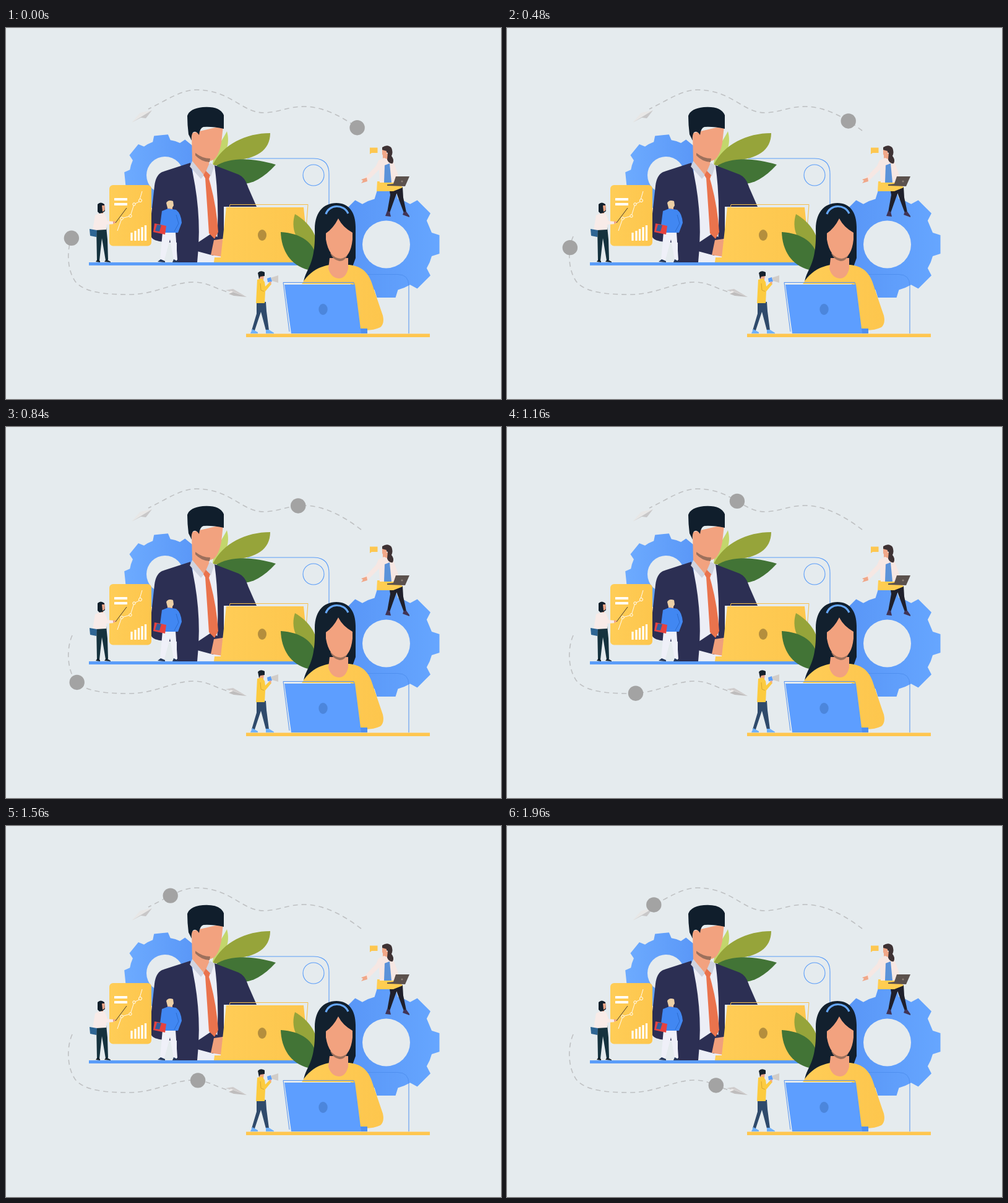
Write an HTML page that moves like this. It is 800 px wide and 600 px high and loops after 2 s.

```html
<!DOCTYPE html>
<html lang="en">
<head>
<meta charset="utf-8">
<title>Teamwork</title>
<style>
html, body { margin: 0; width: 100%; height: 100%; overflow: hidden; background: #e5ebee; }
svg { display: block; width: 800px; height: 600px; }
</style>
</head>
<body>
<svg viewBox="0 0 800 600">
<defs>
  <linearGradient id="blueL"><stop stop-color="#6dabff"/><stop offset="1" stop-color="#5794f6"/></linearGradient>
  <linearGradient id="blueR"><stop stop-color="#5794f6"/><stop offset="1" stop-color="#66a6ff"/></linearGradient>
  <linearGradient id="gold"><stop stop-color="#ffcd57"/><stop offset="1" stop-color="#fdc64d"/></linearGradient>
</defs>

<!-- gears and frames -->
<g id="gearL" fill="url(#blueL)"></g>
<circle cx="257" cy="238" r="30" fill="#e5ebee"/>
<g fill="none" stroke="#5b9df8" stroke-width="1.1">
  <path d="M390 211H497Q522 211 522 236V310"/><circle cx="497" cy="238" r="17"/>
</g>
<g id="gearR" fill="url(#blueR)"></g>
<circle cx="614.5" cy="350" r="38.5" fill="#e5ebee"/>
<path d="M575 398.500H633Q651 398.500 651 417V494" fill="none" stroke="#4f90f0"/>

<!-- leaves behind the man -->
<path d="M334 220C336 198 349 183 357 167C363 189 355 206 338 220Z" fill="#c3d66c"/>
<path d="M334 222C350 188 388 170 427 170C427 198 404 212 368 214L345 222Z" fill="#96a43a"/>
<path d="M338 224C364 207 402 211 436 221C414 245 394 255 372 252Z" fill="#427436"/>

<!-- man -->
<path d="M301 218L338 222L362 378H309L304 300Z" fill="#eceef6"/>
<path d="M301 217L252 233Q242 238 240 255L235 300V338Q238 347 276 347V379H309Q318 300 298 218Z" fill="#2c2f53"/>
<path d="M337 222L376 237Q387 242 391 257L405 289H352V340L341 348Q345 280 337 222Z" fill="#2c2f53"/>
<path d="M310 347L331 333L350 342L335 368L309 361Z" fill="#2c2f53"/>
<path d="M336 343L350 341V370L331 367Z" fill="#f0a07c"/>
<path d="M300 170L351 158L348 186Q342 216 328 215V235L320 239L301 219Z" fill="#f2a27f"/>
<path d="M306 202Q317 211 330 211L329 217Q315 216 306 206Z" fill="#9c705c"/>
<path d="M301 215L320 238L315 244L297 224ZM329 218L337 222L331 240L323 232Z" fill="#cfd3df"/>
<path d="M323 231L330 238L328 244Q340 285 343 330L337 341L328 332Q325 285 322 243L319 238Z" fill="#ea734d"/>
<path d="M293 142Q297 130 318 128Q346 126 352 141V163Q333 159 319 160Q313 162 312 173Q307 165 302 169Q299 173 300 182L295 172Q293 156 293 142Z" fill="#101e2c"/>

<!-- yellow laptop and ledge -->
<path d="M361 291L362 285.500H488L485 325" fill="none" stroke="#f4bd4a"/>
<path d="M356 290H481L490 379H336L337 371H347Z" fill="url(#gold)"/>
<ellipse cx="414" cy="335" rx="7" ry="9" fill="#b48e3d"/>
<path d="M134 379H490V384H134Z" fill="#5b9df9"/>

<!-- woman -->
<path d="M467 301C460 322 466 350 502 367C508 338 490 314 467 301Z" fill="#96a43a"/>
<path d="M444 330C476 332 500 346 503 378L488 391C460 384 445 360 444 330Z" fill="#427436"/>
<path d="M499 325C499 297 514 283 534 283C554 283 565 298 565 322V372L560 386L523 390L498 413H481C483 389 501 387 499 325Z" fill="#12202e"/>
<path d="M478 414C490 394 506 386 523 383H555C579 386 588 399 594 421L609 465Q612 478 605 484Q590 491 570 488L558 414Z" fill="url(#gold)"/>
<path d="M523 372H553V389Q549 405 538 405Q525 404 521 389Z" fill="#f2a27f"/>
<path d="M524 364H553Q549 377 539 377Q528 375 524 364Z" fill="#9c705c"/>
<path d="M537 308Q544 322 560 331V342Q557 371 541 373Q522 372 517 342V332Q529 324 537 308Z" fill="#f2a27f"/>
<path d="M517 301C522 285 546 284 553 300" fill="none" stroke="#66a8ff" stroke-width="3.2"/>

<!-- blue laptop and ledge -->
<path d="M458 491L448 411.500H562L563 416" fill="none" stroke="#5793ee"/>
<path d="M450 415H564L573 486H584V494H461Z" fill="#5d9eff"/>
<path d="M573 486H584V494H574Z" fill="#4f8ff0"/>
<ellipse cx="512.500" cy="455" rx="7.200" ry="9" fill="#4c86dc"/>
<path d="M388 494.500H685V500H388Z" fill="#ffc64f"/>

<!-- chart board -->
<rect x="167" y="254" width="68" height="98.500" rx="6" fill="url(#gold)"/>
<path d="M175 277H196M175 285H196" stroke="#fff" stroke-width="4"/>
<g fill="none" stroke="#fffaf0"><path d="M180 328L187 308L201 304L207 285L215 281L220 264"/></g>
<g fill="#ffca52" stroke="#fff"><circle cx="187" cy="308" r="2.200"/><circle cx="201" cy="304" r="2.200"/><circle cx="207" cy="285" r="2.200"/><circle cx="217" cy="279" r="2.500"/></g>
<path d="M203 344V331M209 344V328M214.500 344V325M220 344V322M225.500 344V319" stroke="#fff" stroke-width="3.200"/>

<!-- presenter -->
<path d="M146 323L162 322L164 342L165 375L161 376L155 340L151 376H147Z" fill="#15323e"/>
<path d="M145 378L148 374L152 377V379ZM159 378L162 374L169 378V379Z" fill="#14202a"/>
<path d="M151 293H157V302H151Z" fill="#f0a788"/>
<path d="M144 303L152 299L160 301L164 312L174 313V317L162 318V326L145 327L142 332L140 327Z" fill="#f8ebe8"/>
<path d="M173 312L179 314L173 317Z" fill="#f0a788"/>
<path d="M148 285Q153 280 159 285L160 296L156 299L151 300L148 297Z" fill="#12202c"/>
<path d="M155 287H159.500V295L156 297Z" fill="#f0a788"/>
<path d="M135 325L147 327L146 338L136 336Z" fill="#2e6593"/>
<path d="M177 315L195 291" stroke="#46382e"/>

<!-- colleague with folder -->
<path d="M253 330H274L277 375H271L265 342L256 375H249Z" fill="#eff0f8"/>
<path d="M245 378L250 374L257 377V379ZM269 379L271 374L279 378V379Z" fill="#27395a"/>
<path d="M261 286H269V297H261Z" fill="#f0a788"/>
<path d="M252 296L262 292L275 294Q283 300 284 315L278 331H250L249 319Z" fill="#4187f2"/>
<path d="M275 302L279 316L272 329" fill="none" stroke="#2d6cce"/>
<path d="M259 283Q262 277 270 280L271 287L268 292L261 291Z" fill="#ecd0a6"/>
<path d="M240 316L259 320L257 334L238 330Z" fill="#e6423f"/>
<path d="M244 318L251 319L248 329L241 328Z" fill="#315d9e"/>

<!-- man with megaphone -->
<path d="M405 442L420 443L421 458L425 489H420L412 459L402 489H397L405 462Z" fill="#2f4a6b"/>
<path d="M395 494L398 487L407 492V494ZM420 494V488H425L433 493V494Z" fill="#70b1fa"/>
<path d="M409 399L417 400L416 408L409 409Z" fill="#f0a788"/>
<path d="M406 407L414 405L418 411L419 418L426 411L429 414L419 426L418 445H404Z" fill="#fccb3f"/>
<path d="M411 413L412 424L417 426" fill="none" stroke="#d9a62b"/>
<path d="M407 396Q411 391 418 395V401L411 402L409 406Z" fill="#17222d"/>
<path d="M422 405L428 403L430 410L423 411Z" fill="#5b9df9"/>
<path d="M428 404L440 400V412L430 409Z" fill="#d1cdc9"/>
<path d="M425 411L429 410L428 415Z" fill="#f0a788"/>

<!-- woman on the gear -->
<path d="M619 258L635 257L626 282L620 299L616 298L621 270ZM628 258L641 257L642 274L647 298L643 299L634 275Z" fill="#1f202b"/>
<path d="M613 304L616 296L620 297L622 305ZM641 302L643 297H647L652 304V306Z" fill="#403456"/>
<path d="M600 248L633 249L641 258L626 264H599Z" fill="#ffcd51"/>
<path d="M609 203H617V219H609Z" fill="#f0a788"/>
<path d="M602 214L611 210L626 216L633 235L635 243L626 250H604L603 229L584 248L579 243L598 223Z" fill="#f6e7e3"/>
<path d="M612 222L620 219L623 250H611Z" fill="#5b92d9"/>
<path d="M583 242L574 245L577 247L574 251L584 248Z" fill="#f0a788"/>
<path d="M608 193Q617 187 623 194Q626 201 623 207Q628 213 625 219Q619 220 616 213L617 202L608 198Z" fill="#3e3234"/>
<path d="M608 197L615 199V207Q610 209 608 204Z" fill="#f0a788"/>
<path d="M630 240L652 240L645 256L616 255V253L626 252Z" fill="#5b514d"/>
<circle cx="640" cy="248" r="1.500" fill="#8b8079"/>
<path d="M588 193.500H600.500V202H591L588 204Z" fill="#fdc750"/>

<!-- flight paths and paper planes -->
<g fill="none" stroke="#bfc1c3" stroke-width="1.600" stroke-dasharray="8 6">
  <path id="upper" d="M574 166C548 146 515 127 482 127C455 127 440 137 416 137C382 137 362 100 308 100C282 100 260 117 230 131"/>
  <path id="lower" d="M107 337C98 357 98 390 112 410C128 430 170 431 200 431C240 431 270 411 303 411C325 411 335 420 358 427"/>
</g>
<path d="M203 153L217 137L236 133Z" fill="#e8e7e6"/>
<path d="M203 153L236 133L226 146L218 145Z" fill="#c8c7c8"/>
<path d="M355 424L367 422L389 435Z" fill="#cfcccc"/>
<path d="M360 430L363 425L389 435Z" fill="#eeeceb"/>
<path d="M360 430L367 427L389 435L368 433Z" fill="#bfbdbd"/>
<g fill="#a3a3a3"><circle id="ballU" r="12.200"/><circle id="ballL" r="12.200"/></g>
</svg>

<script>
const $ = id => document.getElementById(id);

function gear(id, x, y, r, turn) {
  const at = (a, d, w) => {
    const c = Math.cos(a), s = Math.sin(a);
    return `${x + d * c - w * s} ${y + d * s + w * c}`;
  };
  const inner = r * .855;
  let d = '';
  for (let i = 0; i < 8; i++) {
    const a = turn + i * Math.PI / 4;
    d += `${i ? `A${inner} ${inner} 0 0 1 ` : 'M'}${at(a, inner, -r * .22)}` +
      `L${at(a, r, -r * .175)}L${at(a, r, r * .175)}L${at(a, inner, r * .22)}`;
  }
  $(id).innerHTML = `<path d="${d}Z"/>`;
}
gear('gearL', 257, 238, 65, -.1);
gear('gearR', 614.5, 350, 86, 0);

// Distance along a path closest to a point
function project(path, [x, y]) {
  let best = 0, min = Infinity;
  for (let s = 0; s <= path.getTotalLength(); s += .5) {
    const p = path.getPointAtLength(s), d = Math.hypot(p.x - x, p.y - y);
    if (d < min) { min = d; best = s; }
  }
  return best;
}

const times = [0, 280, 640, 840, 1160, 1560, 1960];

// Smooth travel through the given stops, at rest at both ends
function traveller(pathId, ballId, stops) {
  const path = $(pathId), ball = $(ballId);
  const dist = stops.map(p => project(path, p));
  const slope = i => (dist[i + 1] - dist[i]) / (times[i + 1] - times[i]);
  const speed = times.map((_, i) => {
    if (!i || i === times.length - 1) return 0;
    const a = slope(i - 1), b = slope(i);
    return Math.min((a + b) / 2, 3 * a, 3 * b);
  });
  return t => {
    let i = 0;
    while (i < times.length - 2 && t >= times[i + 1]) i++;
    const h = times[i + 1] - times[i], u = Math.min(1, (t - times[i]) / h), v = 1 - u;
    const s = v * v * (1 + 2 * u) * dist[i] + u * u * (3 - 2 * u) * dist[i + 1] +
      h * u * v * (v * speed[i] - u * speed[i + 1]);
    const p = path.getPointAtLength(s);
    ball.setAttribute('cx', p.x);
    ball.setAttribute('cy', p.y);
  };
}

const movers = [
  traveller('upper', 'ballU', [[568, 161], [566, 159], [527, 139], [472, 127], [372, 120], [266, 113], [237, 127]]),
  traveller('lower', 'ballL', [[107, 340], [106, 342], [102, 376], [115, 413], [208, 431], [310, 412], [337, 421]])
];

const start = performance.now();
function draw() {
  const t = Math.floor((performance.now() - start) % 2000 / 40) * 40;
  movers.forEach(move => move(t));
  requestAnimationFrame(draw);
}
draw();
</script>
</body>
</html>
```
